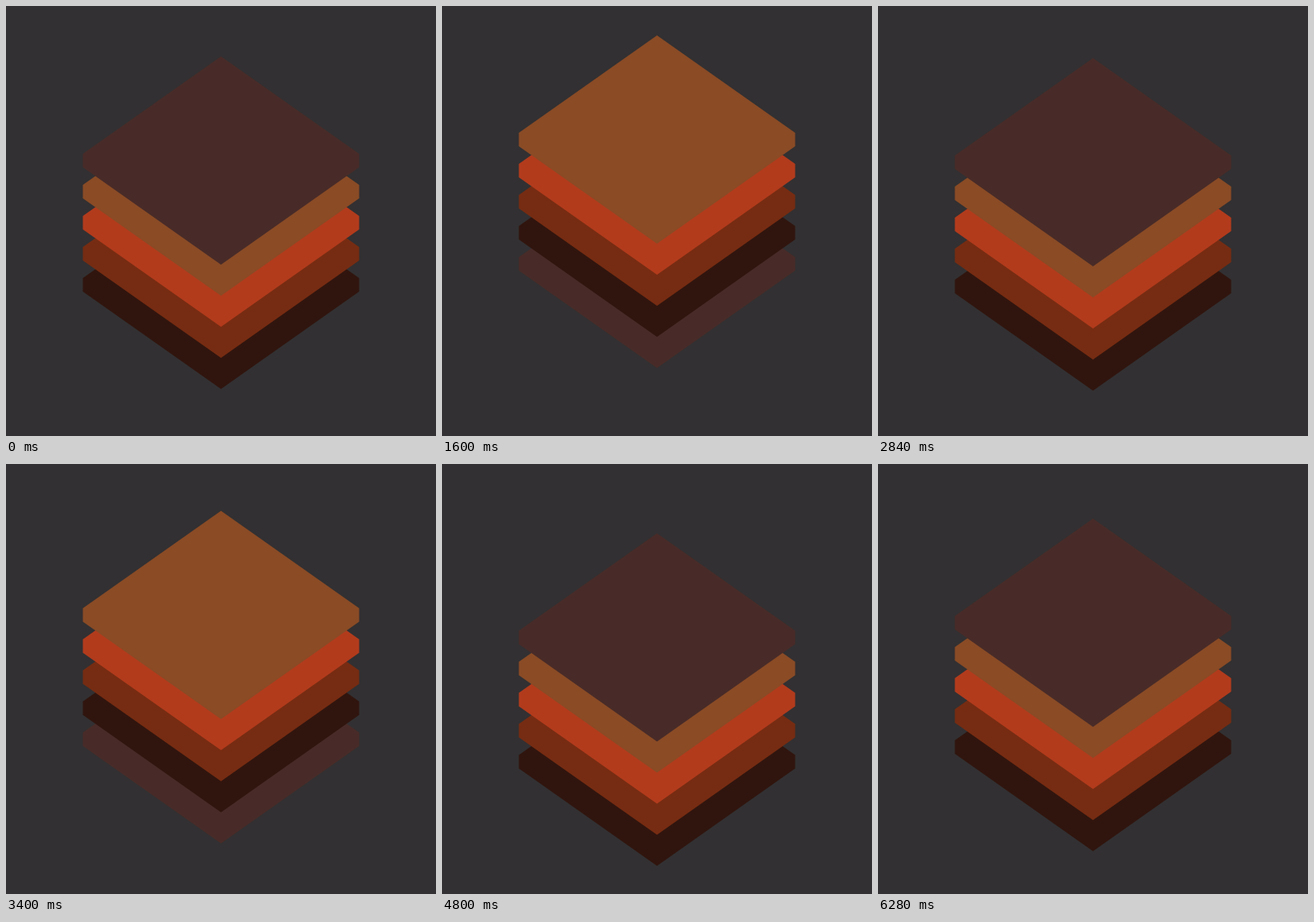
Animation, 512 px wide and 512 px high, one loop 6320 ms. Source, as an HTML page with a canvas:

```html
<!DOCTYPE html>
<html lang="en">
<head>
<meta charset="utf-8">
<title>Layer stack</title>
<style>
  html, body { margin: 0; width: 100%; height: 100%; overflow: hidden; background: #323032; }
  canvas { display: block; width: 100%; height: 100%; }
</style>
</head>
<body>
<canvas id="stage" width="512" height="512"></canvas>
<script>
const ctx = document.getElementById('stage').getContext('2d');

const BACKGROUND = '#323032';
const COLORS = ['#482b28', '#8a4b25', '#b23b1c', '#762c12', '#30150e'];
const LOOP = 6320, STEP = 40;
const RISE_START = 960, FALL_START = 4240;
const SPACING = 37, START_Y = 60;
const TOP_LIMIT = 33, BOTTOM_LIMIT = 87.5;

// Keys: [step, distance travelled, speed per step]
const RISE = [[0, 0, 3.7], [16, 62, 4], [29, 115, 4], [47, 183, 3.5], [64, 232, 1.6], [68, 236, 0.6]];
const FALL = [[0, 0, 1.5], [6, 22, 5.7], [20, 112, 5.9], [29, 156, 4.4], [38, 193, 3.9], [51, 241, 3.65]];

// Cubic Hermite interpolation, clamped at both ends
function travel(keys, step) {
  const last = keys[keys.length - 1];
  if (step <= 0) return 0;
  if (step >= last[0]) return last[1];
  const i = keys.findIndex(key => key[0] > step);
  const [n0, p0, v0] = keys[i - 1], [n1, p1, v1] = keys[i];
  const span = n1 - n0, u = (step - n0) / span;
  const ease = u * u * (3 - 2 * u);
  return p0 + (p1 - p0) * ease
    + span * u * (1 - u) * (v0 * (1 - u) - v1 * u);
}

// Apex of the stack and how many layers have left its top
function pose(time) {
  const risen = travel(RISE, Math.floor((time - RISE_START) / STEP));
  let y = START_Y - risen;
  let passed = Math.max(0, Math.ceil((TOP_LIMIT - y) / SPACING));
  if (time >= FALL_START) {
    y += travel(FALL, Math.floor((time - FALL_START) / STEP));
    const returned = Math.ceil((y + passed * SPACING - BOTTOM_LIMIT) / SPACING);
    passed -= Math.max(0, returned);
  }
  return { apex: y + passed * SPACING, passed };
}

function drawLayer(y, color) {
  const left = 91.5, right = 420.5, middle = 256;
  ctx.fillStyle = color;
  ctx.beginPath();
  ctx.moveTo(middle, y);
  ctx.lineTo(right, y + 116);
  ctx.lineTo(right, y + 132);
  ctx.lineTo(middle, y + 248);
  ctx.lineTo(left, y + 132);
  ctx.lineTo(left, y + 116);
  ctx.fill();
}

function draw(now) {
  const { apex, passed } = pose(now % LOOP);
  ctx.fillStyle = BACKGROUND;
  ctx.fillRect(0, 0, 512, 512);
  for (let i = COLORS.length - 1; i >= 0; i--) {
    drawLayer(apex + i * SPACING, COLORS[(passed + i) % COLORS.length]);
  }
}

let start;
function tick(now) {
  start ??= now;
  draw(Math.max(0, now - start));
  requestAnimationFrame(tick);
}
draw(0);
requestAnimationFrame(tick);
</script>
</body>
</html>
```
